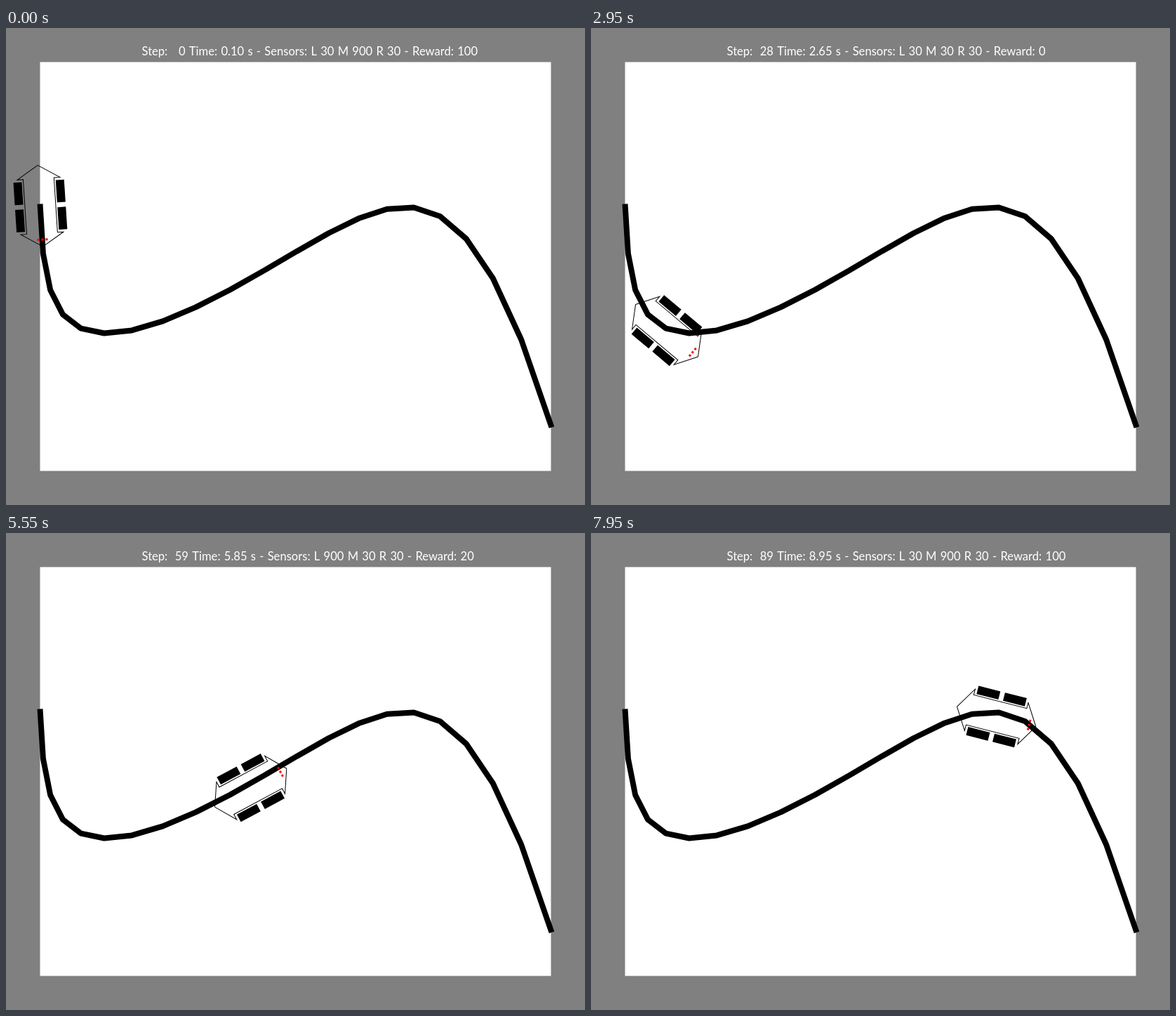
Animation, 825 px wide and 679 px high, one loop 8000 ms. Source, as an HTML page with a canvas:

```html
<!DOCTYPE html>
<html lang="en">
<head>
<meta charset="utf-8">
<title>Line follower</title>
<style>
html, body { margin: 0; width: 100%; height: 100%; overflow: hidden; background: #808080; }
canvas { display: block; }
</style>
</head>
<body>
<canvas id="stage" width="825" height="679"></canvas>
<script>
const ctx = document.getElementById('stage').getContext('2d');
const LOOP = 8000, TICK = 50, PAUSE = 150;
const SENSOR_X = 48, SENSOR_SIDES = [-6, 0, 6];

const mix = (a, b, k) => a + (b - a) * k;
const clamp = k => Math.max(0, Math.min(1, k));

// The road is one Bezier curve cut into 20 straight pieces.
const handles = [[48, 250], [56, 519], [101, 513], [461, 344], [522, 206], [627, 79], [777, 568]];

function bezier(points, t) {
  if (points.length === 1) return points[0];
  const next = points.slice(1).map((p, i) => p.map((v, axis) => mix(points[i][axis], v, t)));
  return bezier(next, t);
}
const road = Array.from({ length: 21 }, (_, i) => bezier(handles, i / 20));

// Steps come in bursts with a short pause between them: [start, steps].
const bursts = [[100, 8], [1250, 11], [2300, 13], [3450, 11], [4500, 15], [5550, 17], [6700, 11], [7750, 3]];

const stepTimes = bursts.flatMap(([start, count], i) => {
  const next = i + 1 < bursts.length ? bursts[i + 1][0] : LOOP + 100;
  const gap = (next - PAUSE - start) / (count - 1);
  return Array.from({ length: count }, (_, n) => Math.round((start + n * gap) / TICK) * TICK);
});

// Way points of the car.
const route = [
  { step: 0, clock: 0.10, x: 48.4, y: 252.8, deg: 86.3 },
  { step: 8, clock: 1.05, x: 55, y: 350, deg: 77 },
  { step: 19, clock: 1.95, x: 75, y: 392.2, deg: 52.2 },
  { step: 28, clock: 2.65, x: 107.5, y: 430.2, deg: 40 },
  { step: 34, clock: 3.10, x: 123, y: 432.5, deg: 6 },
  { step: 45, clock: 4.15, x: 202.2, y: 425, deg: -11 },
  { step: 59, clock: 5.85, x: 348.2, y: 362.2, deg: -28.2 },
  { step: 75, clock: 7.85, x: 514.3, y: 267.3, deg: -19.1 },
  { step: 89, clock: 8.95, x: 577.2, y: 260.9, deg: 14.3 }
];
const rad = deg => deg * Math.PI / 180;

function hermite(a, b, slopeA, slopeB, k) {
  const ease = k * k * (3 - 2 * k);
  return mix(a, b, ease) + slopeA * k * (1 - k) ** 2 - slopeB * k * k * (1 - k);
}

// Between way points the car leaves and arrives along its heading.
function poseAt(step) {
  const i = Math.max(1, route.findIndex(p => p.step >= step));
  const a = route[i - 1], b = route[i];
  const k = (step - a.step) / (b.step - a.step);
  const reach = Math.hypot(b.x - a.x, b.y - a.y);
  const glide = (axis, wave) =>
    hermite(a[axis], b[axis], reach * wave(rad(a.deg)), reach * wave(rad(b.deg)), k);
  return {
    x: glide('x', Math.cos),
    y: glide('y', Math.sin),
    angle: rad(mix(a.deg, b.deg, k)),
    clock: Math.round(mix(a.clock, b.clock, k) * 20) / 20
  };
}

function roadDistance(x, y) {
  const gaps = road.slice(1).map(([bx, by], i) => {
    const [ax, ay] = road[i], dx = bx - ax, dy = by - ay;
    const k = clamp(((x - ax) * dx + (y - ay) * dy) / (dx * dx + dy * dy));
    return Math.hypot(x - ax - k * dx, y - ay - k * dy);
  });
  return Math.min(...gaps);
}

// 900 on the black line, 30 on white, a ramp at the edge.
function senseRoad({ x, y, angle }) {
  const c = Math.cos(angle), s = Math.sin(angle);
  return SENSOR_SIDES.map(side => {
    const d = roadDistance(x + c * SENSOR_X - s * side, y + s * SENSOR_X + c * side);
    return Math.round(mix(900, 30, clamp((d - 2.25) / 2.2)));
  });
}

function rewardFor(l, m, r) {
  if (m > 500) return 100;
  const side = Math.max(l, r);
  return side > 800 ? 20 : side > 100 ? 10 : 0;
}

function drawRoad() {
  ctx.lineWidth = 8;
  ctx.lineJoin = 'bevel';
  ctx.beginPath();
  for (const p of road) ctx.lineTo(...p);
  ctx.stroke();
}

function drawCar({ x, y, angle }) {
  ctx.save();
  ctx.translate(x, y);
  ctx.rotate(angle);
  ctx.lineWidth = 1;
  ctx.lineJoin = 'miter';
  ctx.fillStyle = '#000';
  for (const side of [-1, 1]) {
    ctx.beginPath();
    ctx.moveTo(-58, 0);
    ctx.lineTo(-39, 30.5 * side);
    ctx.lineTo(-39, 22 * side);
    ctx.lineTo(39, 22 * side);
    ctx.lineTo(39, 30.5 * side);
    ctx.lineTo(58, 0);
    ctx.stroke();
    for (const end of [-1, 1]) ctx.fillRect(19.4 * end - 16, 30.2 * side - 6, 32, 12);
  }
  ctx.fillStyle = '#f00';
  for (const v of SENSOR_SIDES) ctx.fillRect(SENSOR_X - 1.5, v - 1.5, 3, 3);
  ctx.restore();
}

function draw(step) {
  const pose = poseAt(step);
  const [l, m, r] = senseRoad(pose);
  ctx.fillStyle = '#808080';
  ctx.fillRect(0, 0, 825, 679);
  ctx.fillStyle = '#fff';
  ctx.fillRect(48.5, 48.5, 728, 582);

  ctx.save();
  ctx.translate(0.5, 0.5);
  ctx.strokeStyle = '#000';
  drawRoad();
  drawCar(pose);
  ctx.restore();

  ctx.fillStyle = '#fff';
  ctx.font = '16.6px Lato, "Noto Sans", sans-serif';
  ctx.wordSpacing = '1px';
  ctx.fillText(`Step: ${String(step).padStart(3)} Time: ${pose.clock.toFixed(2)} s - ` +
    `Sensors: L ${l} M ${m} R ${r} - Reward: ${rewardFor(l, m, r)}`, 193.5, 39);
}

const origin = performance.now();
function tick() {
  const t = (performance.now() - origin) % LOOP;
  draw(stepTimes.filter(start => start <= t).length);
  requestAnimationFrame(tick);
}
tick();
</script>
</body>
</html>
```
